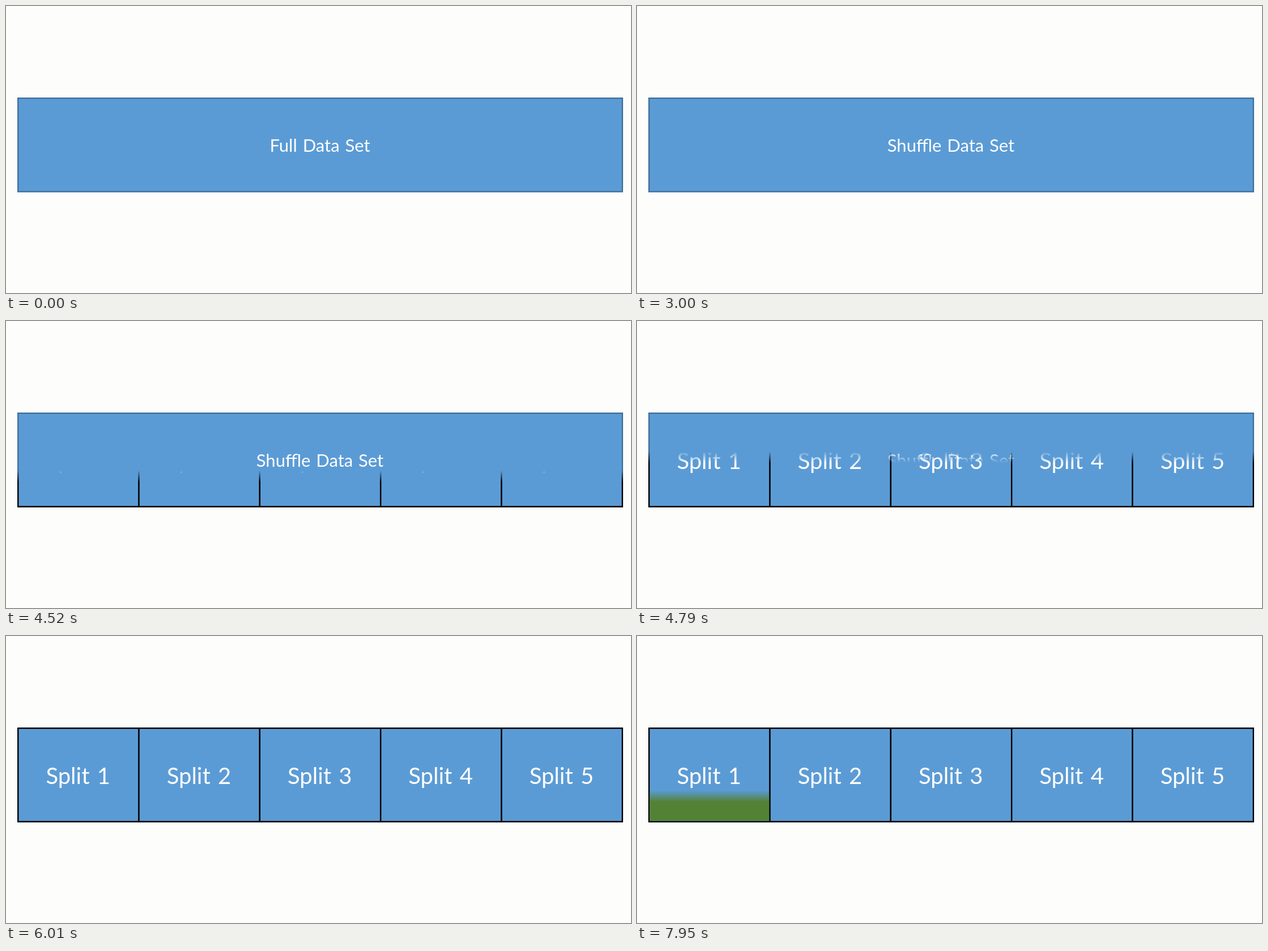
An HTML page that plays this animation: 1103 px wide and 508 px high, repeating every 7990 ms.

```html
<!DOCTYPE html>
<html lang="en">
<head>
<meta charset="utf-8">
<title>Data set split</title>
<style>
  html, body { margin: 0; height: 100%; overflow: hidden; background: #fdfdfc; }
  svg { display: block; width: 1103px; height: 508px; }
  rect { fill: #5b9bd5; stroke-width: 2.4; }
  text { fill: #fff; font: 31px Lato, Carlito, Calibri, sans-serif; text-anchor: middle; word-spacing: 2px; }
  #splits rect { stroke: #000; }
  #splits text { font-size: 40px; word-spacing: 3px; }
</style>
</head>
<body>
<svg viewBox="0 0 1103 508">
  <defs id="defs"></defs>
  <rect x="21.2" y="163.2" width="1066.6" height="165.4" stroke="#41719c"/>
  <text id="title" x="554" y="258"></text>
  <g id="splits" mask="url(#splitMask)"></g>
</svg>
<script>
const LOOP = 7990, WIPE = 1500, FEATHER = 20;
const TOP = 162, BOTTOM = 330, LEFT = 21.2, PITCH = 213.32;
const RENAME_AT = 2050, SPLIT_AT = 4000, TEST_AT = 7500;
const $ = id => document.getElementById(id);

// A soft-edged mask that uncovers its element from the bottom up.
function addWipe(name) {
  $('defs').innerHTML += `
    <linearGradient id="${name}Edge" gradientUnits="userSpaceOnUse" x1="0" x2="0">
      <stop offset="0" stop-color="#fff" stop-opacity="0"/>
      <stop offset="1" stop-color="#fff"/>
    </linearGradient>
    <mask id="${name}Mask" maskUnits="userSpaceOnUse" x="0" y="0" width="1103" height="508">
      <path d="M0 0H1103V508H0Z" fill="url(#${name}Edge)"/>
    </mask>`;
}

function setWipe(name, elapsed) {
  const p = Math.min(1, Math.max(0, elapsed / WIPE));
  const y = BOTTOM - p * (BOTTOM - TOP + FEATHER);
  $(name + 'Edge').setAttribute('y1', y);
  $(name + 'Edge').setAttribute('y2', y + FEATHER);
  return p > 0 ? 'visible' : 'hidden';
}

addWipe('split');
addWipe('test');

let boxes = '', labels = '';
for (let i = 0; i < 5; i++) {
  const x = LEFT + i * PITCH;
  boxes += `<rect x="${x}" y="163.2" width="${PITCH}" height="165.4"/>`;
  labels += `<text x="${x + PITCH / 2 - 0.7}" y="262">Split ${i + 1}</text>`;
}
const green = `<path id="test" d="M22.4 164.4H233.3V327.4H22.4Z" fill="#548235" mask="url(#testMask)"/>`;
$('splits').innerHTML = boxes + green + labels;

function draw(t) {
  $('title').textContent = (t < RENAME_AT ? 'Full' : 'Shuffle') + ' Data Set';
  $('splits').style.visibility = setWipe('split', t - SPLIT_AT);
  $('test').style.visibility = setWipe('test', t - TEST_AT);
}

const start = performance.now();
function tick() {
  draw((performance.now() - start) % LOOP);
  requestAnimationFrame(tick);
}
tick();
</script>
</body>
</html>
```
